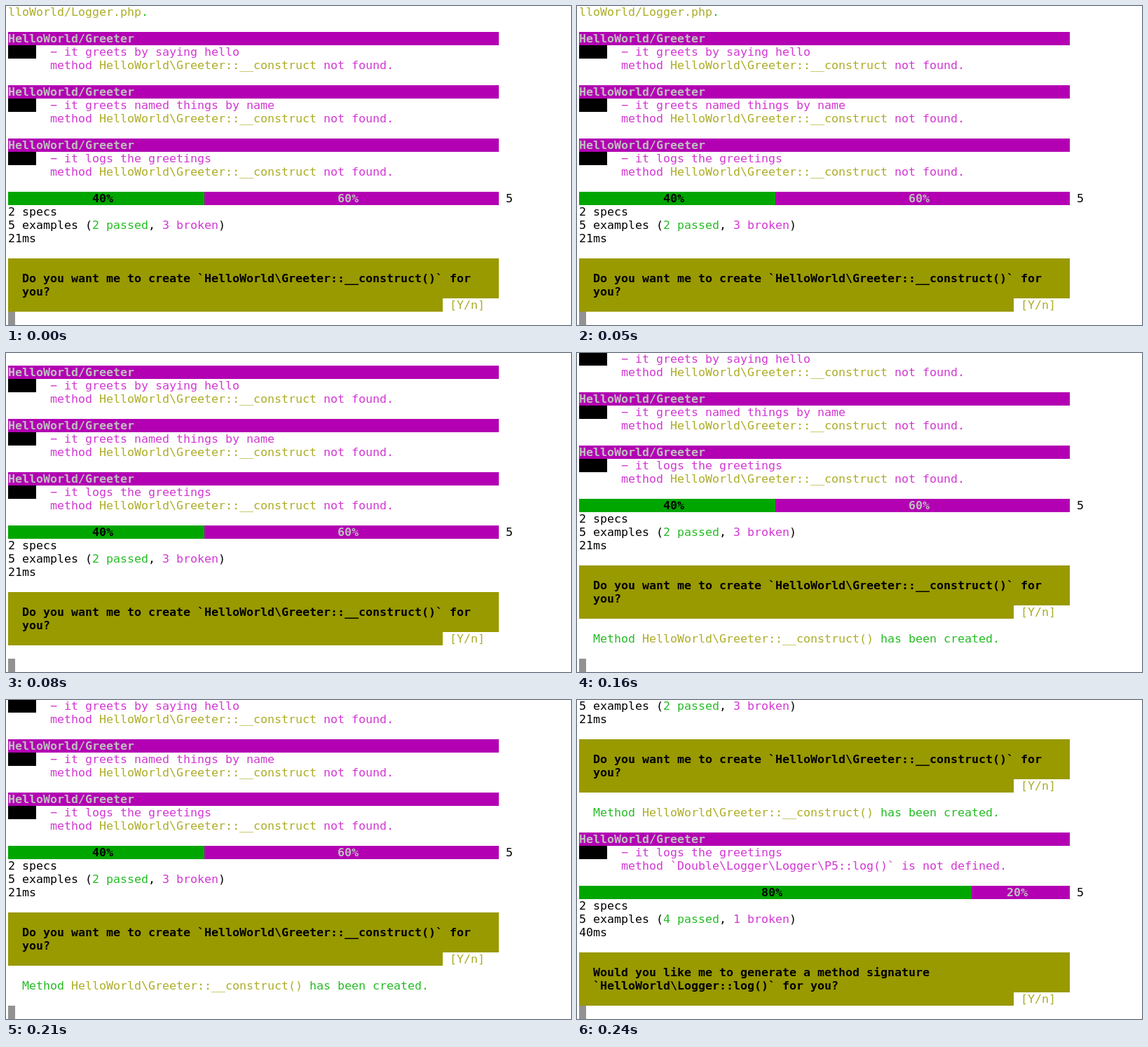
An HTML page with a canvas for the animation above (0.32 s loop, 806 by 455 pixels).

```html
<!DOCTYPE html>
<html lang="en">
<head>
<meta charset="utf-8">
<title>Terminal session</title>
<style>
  html, body { margin: 0; width: 100%; height: 100%; overflow: hidden; background: #fff; }
  canvas { display: block; }
</style>
</head>
<body>
<canvas id="screen" width="806" height="455"></canvas>
<script>
const ctx = document.getElementById('screen').getContext('2d');

const CELL = 10, LINE = 19, LEFT = 3, TOP = -1, BASELINE = 15;
const COLS = 70, LAST_ROW = 23;
const FONT = '16.61px "DejaVu Sans Mono", monospace';
const INK = {
  black: '#000', grey: '#bfbfbf', cursor: '#929292',
  green: '#25bc24', yellow: '#adad27', magenta: '#d338d3',
  greenFill: '#00a600', yellowFill: '#999900', magentaFill: '#b200b2'
};

// The transcript: each line holds filled bands and text spans.
const lines = [];
const band = (col, width, ink) => ({ col, width, ink });
const span = (col, text, ink = 'black', bold = false) => ({ col, text, ink, bold });
const add = (bands = [], spans = []) => lines.push({ bands, spans });

// Places coloured pieces one after another.
function run(col, ...pieces) {
  return pieces.map(([text, ink]) => {
    const piece = span(col, text, ink);
    col += text.length;
    return piece;
  });
}

function failure(title, ...message) {
  add([band(0, COLS, 'magentaFill')], [span(0, 'HelloWorld/Greeter', 'grey', true)]);
  add([band(0, 4, 'black')], [span(6, '\u2212 it ' + title, 'magenta')]);
  add([], run(6, ...message));
  add();
}

function summary(passed, broken, time) {
  const total = passed + broken;
  const split = COLS * passed / total;
  const label = (from, width, count, ink) =>
    span(from + Math.floor((width - 3) / 2), count * 100 / total + '%', ink, true);
  add(
    [band(0, split, 'greenFill'), band(split, COLS - split, 'magentaFill')],
    [label(0, split, passed, 'black'), label(split, COLS - split, broken, 'grey'),
     span(71, String(total))]
  );
  add([], [span(0, '2 specs')]);
  add([], run(0, [total + ' examples (', 'black'], [passed + ' passed', 'green'],
    [', ', 'black'], [broken + ' broken', 'magenta'], [')', 'black']));
  add([], [span(0, time + 'ms')]);
  add();
}

function question(first, second) {
  const full = [band(0, COLS, 'yellowFill')];
  add(full);
  add(full, [span(2, first, 'black', true)]);
  add(full, [span(2, second, 'black', true)]);
  add([band(0, 62, 'yellowFill')], [span(63, '[Y/n]', 'yellow')]);
  add();
}

const missing = [
  ['method ', 'magenta'],
  ['HelloWorld\\Greeter::__construct', 'yellow'],
  [' not found.', 'magenta']
];

add([], run(0, ['lloWorld/Logger.php', 'yellow'], ['.', 'green']));
add();
failure('greets by saying hello', ...missing);
failure('greets named things by name', ...missing);
failure('logs the greetings', ...missing);
summary(2, 3, 21);
question('Do you want me to create `HelloWorld\\Greeter::__construct()` for', 'you?');
const asked = lines.length;
add([], run(2, ['Method ', 'green'], ['HelloWorld\\Greeter::__construct()', 'yellow'],
  [' has been created.', 'green']));
add();
const created = lines.length;
failure('logs the greetings',
  ['method `Double\\Logger\\Logger\\P5::log()` is not defined.', 'magenta']);
summary(4, 1, 40);
question('Would you like me to generate a method signature',
  '`HelloWorld\\Logger::log()` for you?');

// How far the terminal has scrolled and how much has been printed.
const STEP = 80;
const states = [
  { scroll: 0, printed: asked },
  { scroll: 1, printed: asked },
  { scroll: 3, printed: created },
  { scroll: 16, printed: lines.length }
];

function fillCells(row, { col, width, ink }) {
  ctx.fillStyle = INK[ink];
  ctx.fillRect(LEFT + col * CELL, TOP + row * LINE, width * CELL, LINE);
}

function drawText(row, { col, text, ink, bold }) {
  ctx.font = (bold ? 'bold ' : '') + FONT;
  ctx.fillStyle = INK[ink];
  [...text].forEach((char, i) =>
    ctx.fillText(char, LEFT + (col + i) * CELL, TOP + row * LINE + BASELINE));
}

function draw({ scroll, printed }) {
  ctx.fillStyle = '#fff';
  ctx.fillRect(0, 0, 806, 455);
  lines.slice(scroll, printed).forEach(({ bands, spans }, row) => {
    bands.forEach(item => fillCells(row, item));
    spans.forEach(item => drawText(row, item));
  });
  fillCells(LAST_ROW, band(0, 1, 'cursor'));
}

const start = performance.now();
function tick() {
  const elapsed = performance.now() - start;
  draw(states[Math.floor(elapsed / STEP) % states.length]);
  requestAnimationFrame(tick);
}
tick();
</script>
</body>
</html>
```
